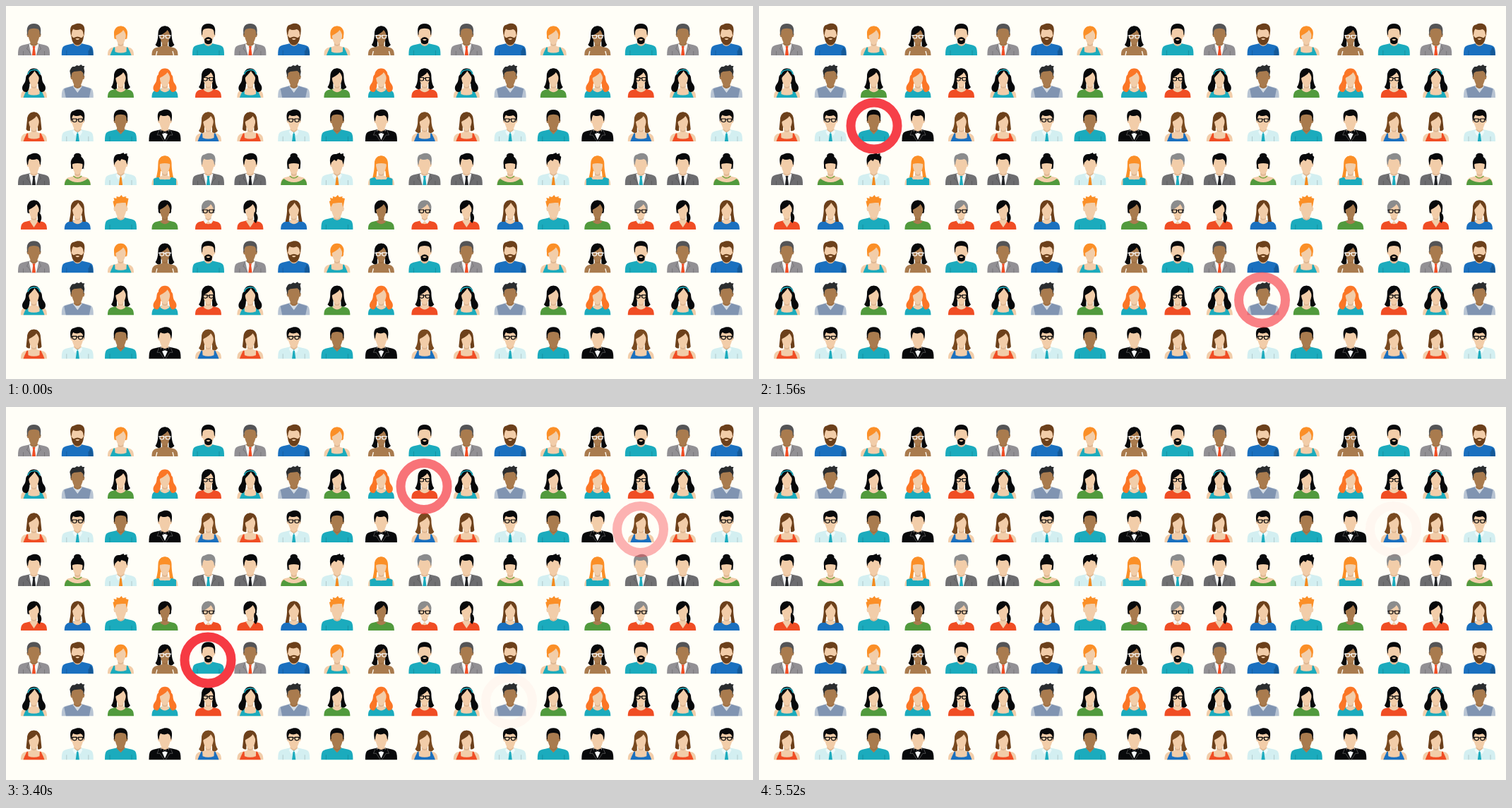
An HTML page that plays this animation: 1058 by 529 pixels, repeating every 5560 ms.

```html
<!DOCTYPE html>
<html lang="en">
<head>
<meta charset="utf-8">
<title>Crowd</title>
<style>
html, body { margin: 0; width: 100%; height: 100%; overflow: hidden; background: #fffef7; }
svg { display: block; width: 100%; height: 100%; }
</style>
</head>
<body>
<svg id="stage" viewBox="0 0 1058 529"></svg>
<script>
const LIGHT = '#f2cda9', BROWN = '#a97b4e', BLACK = '#08090b', TEAL = '#1babbd', RED = '#f04d24',
  GREEN = '#519a3d', BLUE = '#1a70bf', ORANGE = '#fb8f27', CHESTNUT = '#6c401b', ICE = '#d3eff1',
  PAPER = '#fffef7', SHADE = 'rgba(0,0,0,.2)';

// Each person stands on y = 0, centred on x = 0.
const fill = (color, d) => `<path fill="${color}" d="${d}"/>`;
const line = (color, d, width = 1) => `<path fill="none" stroke="${color}" stroke-width="${width}" d="${d}"/>`;

const wide = color => fill(color, 'M-22.5 0C-22.5-10-21.5-13-16-14.5L-5-17H5L16-14.5C21.5-13 22.5-10 22.5 0Z');
const slim = color => fill(color, 'M-18.5 0C-18.5-8-16-10.5-10-11.5L-4-13H4L10-11.5C16-10.5 18.5-8 18.5 0Z');
const sleeves = line(SHADE, 'M-15.5 0V-7M15.5 0V-7', .8);
const face = (skin, w) =>
  fill(skin, `M${-w}-34C${-w}-43 ${w}-43 ${w}-34C${w}-23 4-15 0-15S${-w}-23 ${-w}-34Z`);
const neck = (skin, d) => fill(skin, d) + fill('rgba(90,40,0,.13)', 'M-4-20H4V-15Q0-11-4-15Z');
const manHead = (skin, collar = 'M-4.5-21H4.5L5.5-16Q0-10-5.5-16Z') =>
  neck(skin, collar) + fill(skin, 'M-8-32Q-11.5-32-9-26L9-26Q11.5-32 8-32Z') + face(skin, 8.5);
const womanHead = (skin, collar = 'M-4-20H4V-13L7-11.5Q0-4-7-11.5L-4-13Z') => neck(skin, collar) + face(skin, 7.8);

const vNeck = 'M-4.5-21H4.5L6-16.5 0-10-6-16.5Z';
const glasses = (y, color = BLACK) =>
  `<g transform="translate(0 ${y})">${line(color, 'M-7-2h5.5v3.5q-2.5 2-5.5 0zM1.5-2H7v3.5q-3 2-5.5 0zM-1.5-1h3M-9-1.5h2M7-1.5h2', 1.2)}</g>`;
const tie = color => fill(color, 'M-2-13H2L1.3-10 2.6 0H-2.6L-1.3-10Z');
const collar = color => fill(color, 'M-5-16L0-12-4-8-7-14ZM5-16L0-12 4-8 7-14Z');
const shirt = (color, tieColor) => wide(color) + sleeves + tie(tieColor);
const suit = (color, tieColor) => wide(color) + fill('#f4f6f6', 'M-7-16L-3.5 0H3.5L7-16Z') + tie(tieColor)
  + line(SHADE, 'M-7-16L-10-9-8-8-3.5 0M7-16L10-9 8-8 3.5 0M-15 0V-6M15 0V-6', .9);
const straps = (skin, color) => slim(skin)
  + fill(color, 'M-15 0L-13.5-4-10-11.5H-8.3L-8-5Q0-2 8-5L8.3-11.5H10L13.5-4 15 0Z');
const broad = (skin, color) => slim(skin) + fill(color, 'M-16 0V-9L-9-11.5-7-8H7L9-11.5 16-9V0Z');
const sweater = color => wide(color) + sleeves;

const cap = 'M-9-28C-11.5-40-8-45 0-45S11.5-40 9-28L8.3-30C8.5-35 7-37 5-37.5Q0-39-5-37.5C-7-37-8.5-35-8.3-30Z';
const parted = 'M-9-28C-11.5-37-10-43-5-43.5C0-46.5 8-45.5 9.5-40C10.5-36 10-33 9-28L8.3-30C8-34 7-36 4-37C0-35-4-36-6-37.5C-8-35-8-32-8.3-30Z';
const ruffled = 'M-9-28C-12-40-8-45-1-44L4-46 5-44 9-45 9-42 11-40 9-29 7-35 1-37-1-34-4-36-8-32Z';
const tousled = 'M-9-28L-11-38-9-42-7-44-4-44-1-46 2-45 5-47 7-45 10-45 9-42 10-37 8.5-29 8-35 5-38-5-37-8-35Z';
const spiky = 'M-9-31L-11-40-9-41-10-45-6-44-6-47-2-46 1-49 3-46 8-47 7-45 11-44 10-39 8.5-31 7-38 2-38-6-37Z';

const straight = 'M-9.5-31C-9.5-45 9.5-45 9.5-31C9.5-22 11-16 12-11H7L6-20H-6L-7-11H-12C-11-16-9.5-22-9.5-31Z';
const flipped = 'M-9.5-31C-9.5-45 9.5-45 9.5-31C9.5-24 11-18 13.5-15Q10-10 5.5-13V-20H-5.5V-13Q-10-10-13.5-15C-11-18-9.5-24-9.5-31Z';
const wavy = 'M-9-33C-9-43 9-43 9-33C13-30 10-25 14-20C19-14 16-7 10-8Q6-11 6-20H-6Q-6-11-10-8C-16-7-19-14-14-20C-10-25-13-30-9-33Z';
const bob = 'M-9.5-31C-9.5-45 9.5-45 9.5-31L11-17Q9-14 5.5-15V-20H-5.5V-15Q-9-14-11-17Z';
const cropped = 'M-9.5-30C-11-45 11-45 9.5-30L8-23H-8Z';

const sweep = 'M-9-23C-10-38-6-41.5 0-41.5S10-38 9-23L7.5-27C7-31 6-33 3.5-36C1-32-4-30-7-28Z';
const middle = 'M-9-22C-10-38-6-41.5 0-41.5S10-38 9-22L7.5-27C7-31 4-33 1-38C-2-33-6-31-7.5-27Z';
const bangs = 'M-9-22C-10-38-6-41.5 0-41.5S10-38 9-22L7-30Q0-32-7-30Z';

const man = (body, skin, color, hair, extra = '', neckline) =>
  body + manHead(skin, neckline) + fill(color, hair) + extra;
const woman = (body, skin, color, back, fringe, extra = '', neckline) =>
  body + fill(color, back) + womanHead(skin, neckline) + fill(color, fringe) + extra;

const beard = fill(CHESTNUT, 'M-8.8-29Q-7-24.5-5-25Q0-28 5-25Q7-24.5 8.8-29C8.8-20 5-14.5 0-14.5S-8.8-20-8.8-29Z')
  + fill(LIGHT, 'M-3-23.5Q0-25 3-23.5Q0-20.5-3-23.5Z');
const goatee = fill(BLACK, 'M-5.5-23Q0-29 5.5-23L5-18Q0-13.5-5-18Z') + fill(LIGHT, 'M-3-22.5Q0-24 3-22.5Q0-19.5-3-22.5Z');
const bowTie = fill(BLACK, 'M-5.5-16L0-14 5.5-16V-10L0-12-5.5-10Z') + line('#888', 'M-1.5-14v2M1.5-14v2', .6);
const tuxedo = wide(BLACK) + fill('#f4f6f6', 'M-6.5-16L0-2 6.5-16Z')
  + line('#777', 'M-8-16L-11-9-7-9-1 0M8-16L11-9 7-9 1 0', .6);
const vest = wide('#b8c4d3') + fill('#8094b1', 'M-16.5 0L-19-12.5-6-17 0-8 6-17 19-12.5 16.5 0Z')
  + fill('#d5dde5', 'M-7-16.5L0-7 7-16.5Z');
const bun = fill(BLACK, 'M-5-40C-7-47 7-47 5-40Z');
const braid = fill(BLACK, 'M6-25C10-23 12-17 10-13L8-9 5-12C7-15 4-19 6-25Z');
const necklace = line('#76a541', 'M-6-13Q0-7 6-13', 1.4);
const offShoulder = slim(LIGHT) + fill(GREEN, 'M-18.5 0Q-18-7-14-9Q-8-4 0-4T14-9Q18-7 18.5 0Z');

const people = [
  man(suit('#929094', RED), BROWN, '#545456', cap),
  man(sweater(BLUE) + fill(SHADE, 'M16-6L18-12Q22-9 22.5 0H16Z'), LIGHT, CHESTNUT, parted, beard),
  woman(straps(LIGHT, TEAL), LIGHT, ORANGE, cropped, sweep),
  woman(slim(BROWN) + line(PAPER, 'M-12.5 0L-11-6M12.5 0L11-6', 1.3), BROWN, BLACK, flipped, sweep, glasses(-26.5, '#fff')),
  man(sweater(TEAL), LIGHT, BLACK, cap, goatee),

  woman(straps(LIGHT, TEAL), LIGHT, BLACK, wavy, middle, line(TEAL, 'M-8.5-33Q-7-39 0-39.5T8.5-33', 1.7)),
  man(vest, BROWN, '#2b2d2f', tousled),
  woman(slim(GREEN), LIGHT, BLACK, flipped, sweep),
  woman(slim(TEAL), LIGHT, '#fb7626', wavy, sweep),
  woman(slim(RED), LIGHT, BLACK, flipped, sweep, glasses(-26.5)),

  woman(straps(LIGHT, RED), LIGHT, CHESTNUT, bob, sweep),
  man(shirt(ICE, TEAL), LIGHT, BLACK, parted, collar('#eefafa') + glasses(-30)),
  man(sweater(TEAL), BROWN, BLACK, cap, '', vNeck),
  man(tuxedo, LIGHT, BLACK, parted, bowTie),
  woman(straps(LIGHT, BLUE), LIGHT, '#794a20', flipped, sweep),

  man(suit('#6c6c6f', '#222326'), LIGHT, BLACK, parted),
  woman(offShoulder, LIGHT, BLACK, cropped, bangs, bun + necklace),
  man(shirt(ICE, '#f38b20'), LIGHT, BLACK, ruffled, collar('#eefafa')),
  woman(broad(LIGHT, TEAL), LIGHT, ORANGE, straight, bangs),
  man(suit('#717173', TEAL), LIGHT, '#8b8c8d', parted),

  woman(slim(RED), LIGHT, BLACK, cropped, sweep, braid, 'M-4-20H4V-13L6-12 0-3-6-12-4-13Z'),
  woman(slim(BLUE), LIGHT, CHESTNUT, straight, middle),
  man(sweater(TEAL), LIGHT, ORANGE, spiky),
  woman(slim(GREEN), BROWN, BLACK, cropped, sweep),
  woman(slim(RED), LIGHT, '#8b8c8d', cropped, sweep, collar('#f4f6f6') + glasses(-26))
];

const columns = [39.5, 101.3, 162.5, 225, 286.5], rows = [70, 130, 192, 254, 317];
const rings = [ // x, y, start
  [163, 170, 60], [712.5, 417, 840], [592, 112.5, 1600], [286, 359, 2100], [898.5, 173.5, 2960]
];

let markup = `<defs>${people.map((art, i) => `<g id="person${i}">${art}</g>`).join('')}</defs>`;
for (let row = 0; row < 8; row++) {
  for (let col = 0; col < 17; col++) {
    const x = columns[col % 5] + Math.floor(col / 5) * 306.4;
    const y = rows[row % 5] + Math.floor(row / 5) * 308.3;
    markup += `<use href="#person${row % 5 * 5 + col % 5}" x="${x}" y="${y}"/>`;
  }
}
for (const [x, y] of rings) {
  markup += `<circle class="ring" cx="${x}" cy="${y}" r="33" fill="none" stroke="#f63a43" stroke-width="13" opacity="0"/>`;
}
const stage = document.getElementById('stage');
stage.innerHTML = markup;
const circles = stage.querySelectorAll('.ring');

const LOOP = 5560, LIFE = 2600, FADE = 1140;
function draw(now) {
  const time = now % LOOP;
  circles.forEach((circle, i) => {
    const age = time - rings[i][2];
    circle.setAttribute('opacity', Math.max(0, Math.min(1, age / FADE, (LIFE - age) / FADE)));
  });
  requestAnimationFrame(draw);
}
requestAnimationFrame(draw);
</script>
</body>
</html>
```
